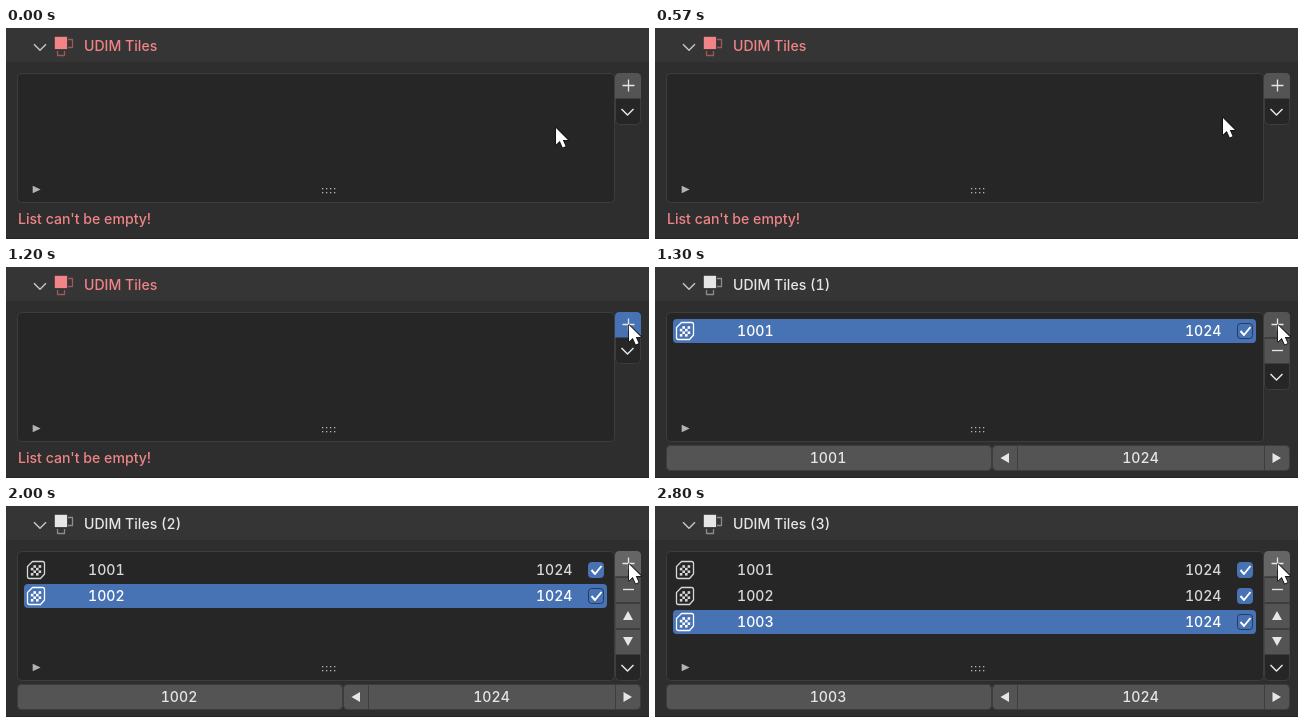
Animation of 643x211 px, one loop 4930 ms. Source, as an HTML page:

```html
<!DOCTYPE html>
<html lang="en">
<head>
<meta charset="utf-8">
<title>UDIM Tiles</title>
<style>
html, body { margin: 0; width: 100%; height: 100%; overflow: hidden; background: #2e2e2e; }
svg { display: block; width: 643px; height: 211px; }
text { font: 500 14.1px Inter, sans-serif; font-variant-numeric: tabular-nums; white-space: pre; }
</style>
</head>
<body>
<svg viewBox="0 0 643 211">
  <g id="panel"></g>
  <path id="cursor" d="M0 0V16.6L3.8 13L6.7 19.6L9.6 18.3L6.8 11.9H12Z" fill="#fff" stroke="#111" stroke-width="1.6" stroke-linejoin="round" paint-order="stroke"/>
</svg>
<script>
const LOOP = 4930;
const BLUE = '#4772b3', GREY = '#545454', HOVER = '#656565', DARK = '#262626', EDGE = '#3d3d3d';
const TEXT = '#e6e6e6', RED = '#f08487';

// [start in ms, number of tiles, colour of the add button]
const STATES = [
  [0, 0, GREY], [1200, 0, BLUE],
  [1300, 1, GREY], [1330, 1, HOVER], [1870, 1, BLUE],
  [1970, 2, GREY], [2000, 2, HOVER], [2670, 2, BLUE],
  [2770, 3, GREY], [2800, 3, HOVER]
];

const rect = (x, y, w, h, fill, r = 0, stroke = 'none') =>
  `<rect x="${x}" y="${y}" width="${w}" height="${h}" rx="${r}" fill="${fill}" stroke="${stroke}"/>`;
const shape = (d, fill) => `<path d="${d}" fill="${fill}"/>`;
const line = (d, stroke = TEXT, width = 1.4) =>
  `<path d="${d}" fill="none" stroke="${stroke}" stroke-width="${width}" stroke-linejoin="round"/>`;
const label = (x, y, value, fill = TEXT, anchor = 'start') =>
  `<text x="${x}" y="${y}" fill="${fill}" text-anchor="${anchor}">${value}</text>`;
const chevron = (x, y, colour) => line(`M${x - 6} ${y - 3}l6 6l6-6`, colour, 1.5);

function header(count) {
  const colour = count ? TEXT : RED;
  const faint = count ? '#8c8c8c' : '#9a5a5b';
  return rect(0, 0, 643, 34, '#353535') + rect(0, 210, 643, 1, '#232323') +
    chevron(34, 19.2, '#c4c4c4') +
    line('M62 11.5H66.5V19.5H62M51.5 23V27.5H58.5V23', faint, 1.3) +
    rect(48.8, 8.8, 12.3, 12.3, colour) +
    label(78, 23, 'UDIM Tiles' + (count ? ` (${count})` : ''), colour);
}

function tileIcon(y, colour) {
  const size = 2.6;
  let cells = '';
  for (let i = 0; i < 16; i++) {
    const col = i % 4, row = i >> 2;
    if ((col + row) % 2) cells += rect(24.8 + col * size, y + 7.2 + row * size, size, size, colour);
  }
  return line(`M26.5 ${y + 3.5}H36.5Q38.5 ${y + 3.5} 38.5 ${y + 5.5}V${y + 16}L34.5 ${y + 20.5}H23.5Q21.5 ${y + 20.5} 21.5 ${y + 18.5}V${y + 8.5}Z`, colour, 1.3) + cells;
}

function tileRow(index, selected) {
  const y = 52 + index * 26;
  const colour = selected ? '#fff' : '#d8d8d8';
  return (selected ? rect(18, y, 583, 24, BLUE, 4) : '') +
    tileIcon(y, colour) +
    label(82, y + 17, 1001 + index, colour) +
    label(566.5, y + 17, 1024, colour, 'end') +
    rect(582.5, y + 4.5, 15, 15, BLUE, 3, selected ? '#263c5e' : BLUE) +
    line(`M585.5 ${y + 12}l3.5 4l6.5-8`, '#fff', 1.9);
}

function sideButtons(count, addColour) {
  const total = [2, 3, 5, 5][count];
  const bottom = 45 + total * 26;
  const top = i => 45.5 + i * 26;
  let out = rect(609.5, 45.5, 25, bottom - 46, DARK, 4, EDGE) +
    shape('M609 70.5V49.5Q609 45 613.5 45H630.5Q635 45 635 49.5V70.5Z', addColour) +
    line('M616.5 57.5H628.5M622.5 51.5V63.5', TEXT, 1.3);
  for (let i = 1; i < total - 1; i++) out += rect(609.5, top(i), 25, 25, GREY);
  if (count) out += line('M617 83.5H628', TEXT, 1.3);
  if (count > 1) out += shape('M617 114L622 105L627 114Z', TEXT) + shape('M617 131L622 140L627 131Z', TEXT);
  return out + chevron(621.5, top(total - 1) + 12.5, TEXT);
}

function fields(count) {
  if (!count) return label(12, 196, "List can't be empty!", RED);
  return rect(11.5, 178.5, 325, 25, GREY, 4, EDGE) +
    rect(337.5, 178.5, 297, 25, GREY, 4, EDGE) +
    line('M362.5 179V203M609.5 179V203', EDGE, 1) +
    shape('M354 186V196L345.5 191Z', TEXT) + shape('M617.5 186V196L626 191Z', TEXT) +
    label(173, 196, 1000 + count, TEXT, 'middle') +
    label(485.5, 196, 1024, TEXT, 'middle');
}

function panel(count, addColour) {
  let out = header(count) + rect(11.5, 45.5, 597, 129, DARK, 4, EDGE);
  for (let i = 0; i < count; i++) out += tileRow(i, i === count - 1);
  out += shape('M26.7 157.7V165.3L34.6 161.5Z', '#b4b4b4');
  for (let i = 0; i < 8; i++) out += rect(316 + (i % 4) * 4, 160 + (i >> 2) * 4, 1.3, 1.3, '#b4b4b4');
  return out + sideButtons(count, addColour) + fields(count);
}

// The pointer moves in small steps: slow start, quick middle, soft stop.
function pointer(t) {
  if (t < 70) return [550, 100];
  if (t < 600) {
    const u = Math.min(1, (1 + Math.floor((t - 70) / 35.7)) / 15);
    const p = u ** 1.5;
    return [550 + 18 * p, 100 - 10 * p];
  }
  const u = Math.min(1, (1 + Math.floor((t - 600) / 33.5)) / 15);
  const p = 3 * u * u - 2 * u ** 3 + 0.5 * (u ** 3 - 2 * u * u + u);
  return [568 + 55 * p, 90 - 32 * p];
}

const panelNode = document.getElementById('panel');
const cursorNode = document.getElementById('cursor');
let shown = '';

function draw(t) {
  let [, count, colour] = STATES.findLast(state => state[0] <= t);
  const [x, y] = pointer(t);
  if (t < 1200 && x >= 610) colour = HOVER;
  if (shown !== count + colour) {
    shown = count + colour;
    panelNode.innerHTML = panel(count, colour);
  }
  cursorNode.setAttribute('transform', `translate(${x} ${y})`);
}

const start = performance.now();
function tick() {
  draw((performance.now() - start) % LOOP);
  requestAnimationFrame(tick);
}
tick();
</script>
</body>
</html>
```
